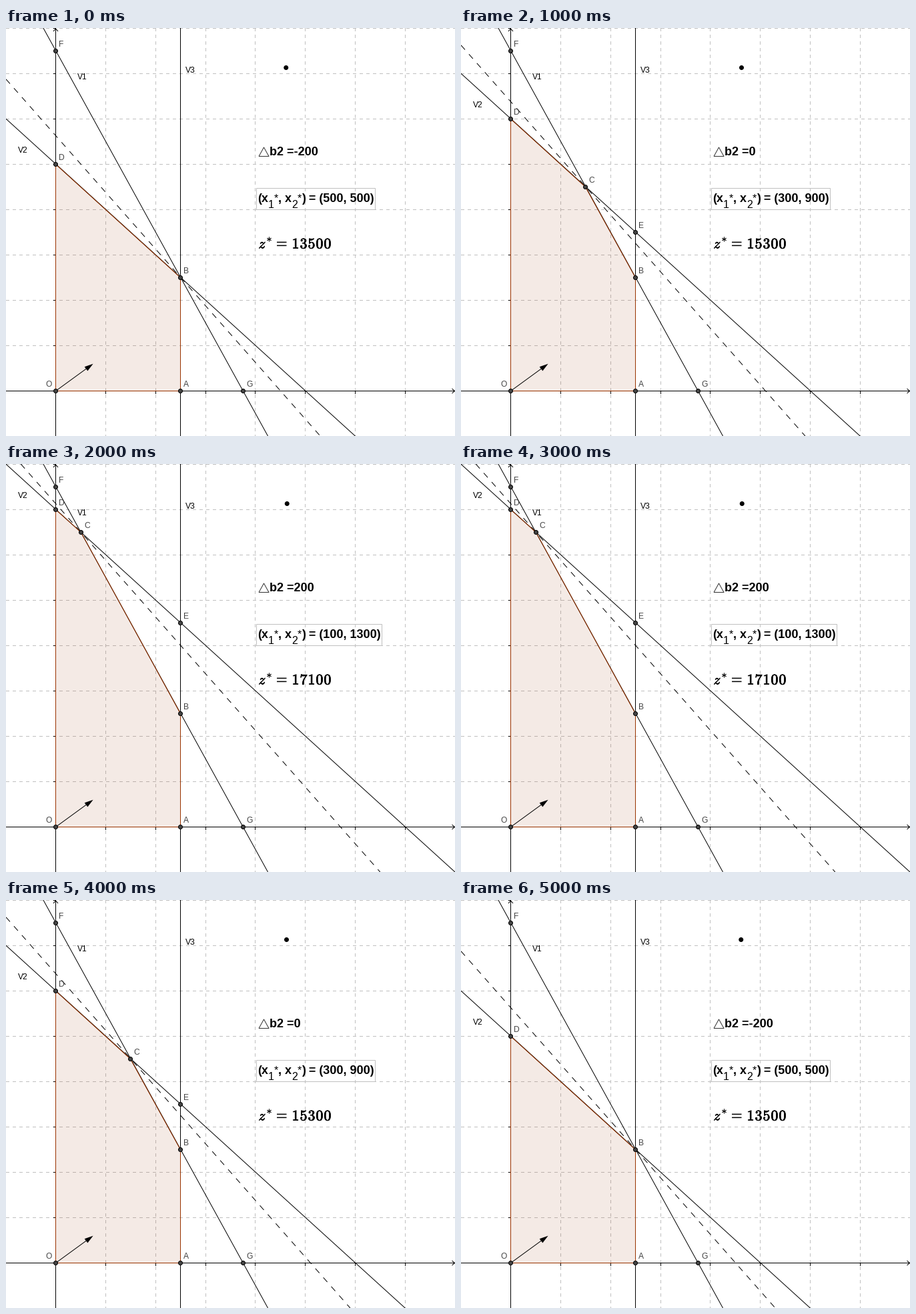
A matplotlib script that plays this animation: 673x612 px, repeating every 5500 ms.

```python
from math import floor

import matplotlib.pyplot as plt
from matplotlib.animation import FuncAnimation
from matplotlib.patches import Circle, Polygon, Rectangle
from matplotlib.patheffects import withStroke

W, H, DPI = 673, 612, 64
PX = 72 / DPI                      # points per pixel
X0, Y0 = 74.65, 544.1              # origin on the stage
KX, KY = 0.374, 0.34               # pixels per unit
BROWN, DARK, GRID = "#993300", "#404040", "#c0c0c0"

plt.rcParams["path.snap"] = False
fig = plt.figure(figsize=(W / DPI, H / DPI), dpi=DPI, facecolor="white")
ax = fig.add_axes([0, 0, 1, 1])
ax.set_xlim(0, W)
ax.set_ylim(H, 0)
ax.axis("off")


def spot(x, y):
    """Centre of the pixel that holds a data point."""
    return floor(X0 + KX * x) + 0.5, floor(Y0 - KY * y) + 0.5


def path(pts, color="black", z=3, **kw):
    xs, ys = zip(*pts)
    line, = ax.plot(xs, ys, color=color, lw=PX, zorder=z,
                    solid_capstyle="butt", dash_capstyle="butt", **kw)
    return line


def text(x, y, s, size=12, color="black", **kw):
    kw.setdefault("family", "Liberation Sans")
    return ax.text(x, y, s, fontsize=size * PX, color=color, ha="left",
                   va="baseline", zorder=8, **kw)


def bold(x, y, s):
    return text(x, y, s, 18, weight="bold")


def math(x, y, s, size, stroke):
    t = text(x, y, s, size, math_fontfamily="cm")
    t.set_path_effects([withStroke(linewidth=stroke * PX, foreground="black")])
    return t


def span(slope, c):
    """Stage ends of y = c - slope * x, clipped to the stage."""
    k = slope * KY / KX
    start = Y0 - KY * c - k * X0
    left = max(0, -start / k)
    right = min(W, (H - start) / k)
    return [(left, start + k * left), (right, start + k * right)]


class Point:
    """A dot with its letter."""

    def __init__(self, name, x=0, y=0, dx=4.5):
        self.dx = dx
        self.dot = ax.add_patch(Circle((0, 0), 3, fc="#444444", ec="black",
                                       lw=PX, zorder=7))
        self.label = text(0, 0, name, color=DARK)
        self.move(x, y)

    def move(self, x, y, shown=True):
        px, py = spot(x, y)
        self.dot.center = px, py
        self.label.set_position((px + self.dx, py - 6.5))
        self.dot.set_visible(shown)
        self.label.set_visible(shown)


# grid, ticks and axes
ox, oy = spot(0, 0)
for i in range(-1, 8):
    x, _ = spot(200 * i, 0)
    path([(x, 0), (x, H)], GRID, 1, dashes=(5, 5))
    path([(x, oy), (x, oy + 4.5)], z=2)
for j in range(9):
    _, y = spot(0, 200 * j)
    path([(0, y), (W, y)], GRID, 1, dashes=(5, 5))
    path([(ox - 3.5, y), (ox, y)], z=2)
path([(0, oy), (W, oy)], z=2)
path([(ox, 0), (ox, H)], z=2)
path([(668.5, oy - 3.5), (672.5, oy), (668.5, oy + 3.5)], z=2)
path([(ox - 3.5, 5), (ox, 1), (ox + 3.5, 5)], z=2)

# constraints and objective line
wall, _ = spot(500, 0)
path(span(2, 1500))
path([(wall, 0), (wall, H)])
v2 = path(span(1, 1200))
goal = path(span(1.25, 1275), dashes=(9, 9))

# feasible region
region = ax.add_patch(Polygon([(0, 0)] * 3, fc=BROWN, alpha=0.1, lw=0, zorder=2.5))
edge = path([(0, 0), (0, 0)], BROWN, 4)

# gradient arrow
path([(ox, oy), (121, 510.6)], z=5)
ax.add_patch(Polygon([(130.6, 503.7), (122.3, 514.4), (117.7, 508.2)],
                     fc="black", lw=0, zorder=5))

Point("O", dx=-15.5)
Point("A", 500, 0)
Point("B", 500, 500)
Point("F", 0, 1500)
Point("G", 750, 0)
pc, pd, pe = Point("C"), Point("D"), Point("E")
slider = ax.add_patch(Circle((420.5, 59.5), 3.5, fc="black", lw=0, zorder=7))

text(107, 77, "V1")
text(269, 67, "V3")
v2_label = text(18, 119, "V2")

# readouts
path([(379, 192.5), (386.5, 179), (394, 192.5), (379, 192.5)], "#333333", 8)
delta = bold(395, 191, "")

frame = ax.add_patch(Rectangle((375.5, 240.5), 178, 32, fill=False, ec=GRID,
                               lw=PX, zorder=6))
bold(377, 261, "(x")
bold(408, 261, ", x")
for x, digit in ((393, "1"), (428, "2")):
    text(x, 270, digit, 16)
    text(x + 9, 260, "*", 16)
best = bold(443, 261, "")

math(378.5, 330.5, r"$z$", 21.2, 0.6)
math(390.5, 321, r"$*$", 16, 0.2)
for y in (320.6, 325.6):
    ax.add_patch(Rectangle((406, y), 14.5, 1.5, fc="black", lw=0, zorder=8))
value = math(428.5, 330.5, r"$\mathbf{0}$", 22, 0.8)


def update(i):
    b = 300 - 100 * abs(i - 5)
    total = 1200 + b
    x, y = 300 - b, 900 + 2 * b
    z = 15 * x + 12 * y

    v2.set_data(*zip(*span(1, total)))
    goal.set_data(*zip(*span(1.25, z / 12)))
    v2_label.set_position((18, 119 - KY * b))
    slider.center = 420.5 + 0.00374 * b, 59.5

    pd.move(0, total, b < 300)
    pc.move(x, y, -200 < b < 300)
    pe.move(500, total - 500, b > -200)

    corners = [spot(*p) for p in ((0, 0), (0, total), (x, y), (500, 500), (500, 0))]
    region.set_xy(corners)
    edge.set_data(*zip(*corners, corners[0]))

    pair = f"({x}, {y})"
    delta.set_text(f"b2 ={b}")
    best.set_text(") = " + pair)
    frame.set_width(178 + 10 * (len(pair) - 10))
    value.set_text(r"$\mathbf{" + r"\hspace{0.05}".join(str(z)) + "}$")
    return []


anim = FuncAnimation(fig, update, frames=11, interval=500, repeat=True,
                     repeat_delay=0, blit=False)
plt.show()
```
